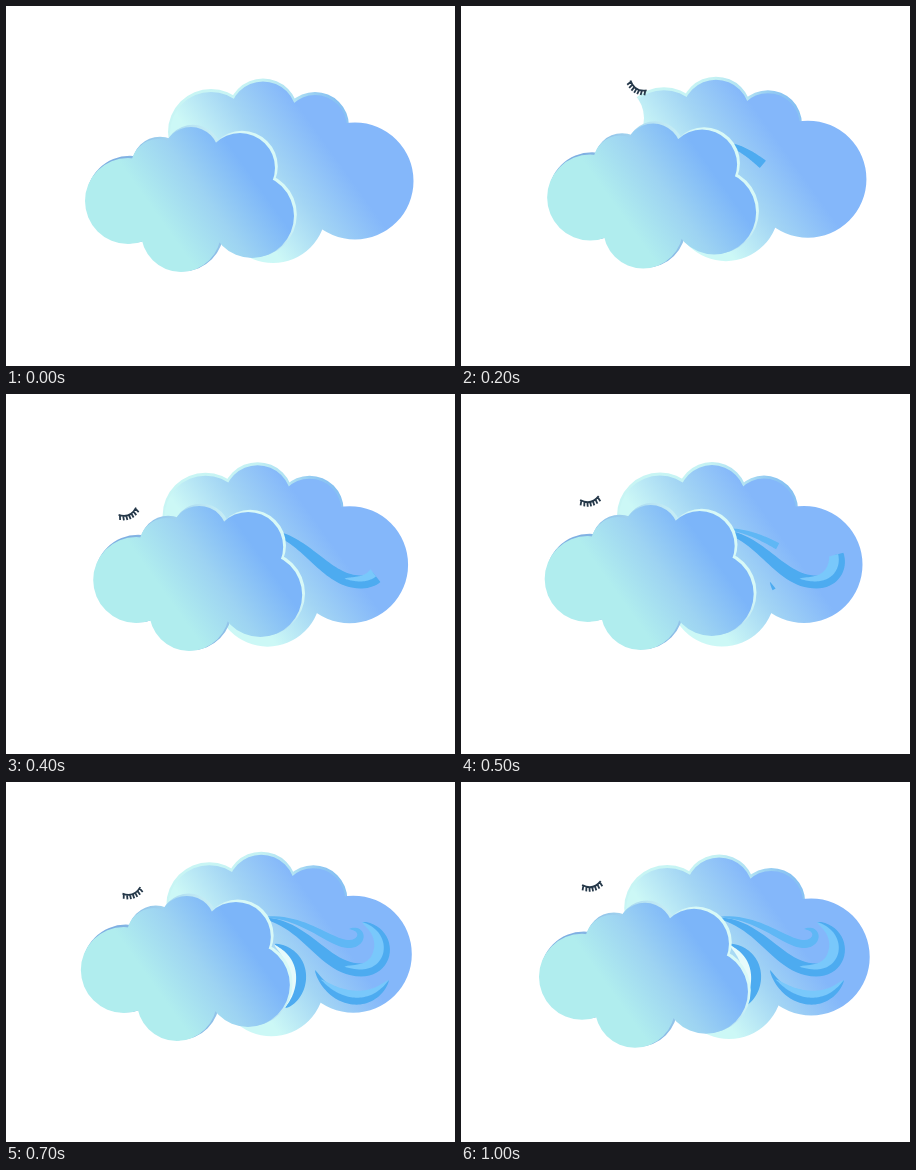
Recreate the animation shown at these times as an HTML page with a canvas. Size 449 by 360 pixels, loop 1050 ms.

```html
<!DOCTYPE html>
<html lang="en">
<head>
<meta charset="utf-8">
<title>Windy clouds</title>
<style>
  html, body { margin: 0; width: 100%; height: 100%; overflow: hidden; background: #fff; }
  canvas { display: block; }
</style>
</head>
<body>
<canvas id="stage" width="449" height="360"></canvas>
<script>
const ctx = document.getElementById('stage').getContext('2d');
const LOOP = 1050, STEP = 50;
const DARK = '#4dabf0', LIGHT = '#79c8fb', PALE = '#e6fbfb';

// puffs of each cloud: x, y, radius, clockwise
const FRONT = [[122, 195, 43], [152, 160, 27], [185, 149, 28], [234, 162, 35], [246, 210, 42], [175, 226, 40]];
const BACK = [[205, 127, 41], [257, 109, 33.5], [309, 121, 32], [349, 175, 58.5], [267, 204, 53]];

// key poses: time, then values
const FRONT_X = [[0, 0], [300, 9.5], [850, -7], [LOOP, 0]];
const FRONT_Y = [[0, 0], [500, -10], [LOOP, 0]];
const BACK_X = [[0, 0], [500, -6], [925, 3.5], [LOOP, 0]];
const BACK_Y = [[0, 0], [450, -4.5], [LOOP, 0]];
const LASHES = [[200, 176, 82, 0.55], [300, 116, 133, -0.6], [500, 129, 107, -0.2], [600, 124, 115, -0.42], [850, 131, 104, -0.2]];

// gusts as chained cubic curves
const MAIN = [[255, 136], [300, 140], [318, 188], [355, 188], [385, 188], [388, 148], [356, 140]];
const UPPER = [[258, 135], [300, 134], [325, 163], [344, 162], [358, 161], [358, 145], [343, 147]];
const LOWER = [[309, 188], [325, 222], [365, 230], [383, 198]];
const SIDE = [[268, 162], [303, 172], [300, 212], [279, 226]];

const clamp = v => Math.max(0, Math.min(1, v));
const ease = k => (1 - Math.cos(Math.PI * k)) / 2;

function pose(keys, t) {
  const next = keys.findIndex(key => key[0] > t);
  if (next < 0) return keys[keys.length - 1].slice(1);
  const a = keys[next - 1], b = keys[next];
  const k = ease((t - a[0]) / (b[0] - a[0]));
  return a.slice(1).map((v, i) => v + (b[i + 1] - v) * k);
}

function along(path, u) {
  const count = (path.length - 1) / 3;
  const seg = Math.min(count - 1, Math.floor(u * count));
  const k = u * count - seg, m = 1 - k;
  const [p, q, r, s] = path.slice(seg * 3, seg * 3 + 4);
  return [0, 1].map(c => m * m * m * p[c] + 3 * m * m * k * q[c] + 3 * m * k * k * r[c] + k * k * k * s[c]);
}

// tapered stroke between two fractions of a path, shifted sideways
function ribbon(path, color, width, to, from = 0, shift = 0) {
  if (to <= from) return;
  const left = [], right = [], n = 48;
  for (let i = 0; i <= n; i++) {
    const u = from + (to - from) * i / n;
    const [x, y] = along(path, u);
    const a = along(path, Math.max(0, u - 0.005)), b = along(path, Math.min(1, u + 0.005));
    const dir = Math.atan2(b[1] - a[1], b[0] - a[0]);
    const body = Math.pow(Math.max(0, Math.sin(Math.PI * (u - from) / (1 - from))), 0.65);
    const side = d => [x + Math.sin(dir) * d, y - Math.cos(dir) * d];
    left.push(side((shift + width / 2) * body));
    right.unshift(side((shift - width / 2) * body));
  }
  ctx.beginPath();
  left.concat(right).forEach(p => ctx.lineTo(...p));
  ctx.fillStyle = color;
  ctx.fill();
}

// diagonal gradient, rising to the right
function shade(x, y, length, colors) {
  const g = ctx.createLinearGradient(x, y, x + length * 0.81, y - length * 0.58);
  colors.forEach((c, i) => g.addColorStop(i / (colors.length - 1), c));
  return g;
}

function cloud(puffs, x, y, grow, fill) {
  ctx.save();
  ctx.translate(x, y);
  ctx.beginPath();
  puffs.forEach(p => ctx.lineTo(p[0], p[1]));
  ctx.closePath();
  for (const [cx, cy, r] of puffs) {
    ctx.moveTo(cx + r + grow, cy);
    ctx.arc(cx, cy, r + grow, 0, Math.PI * 2);
  }
  ctx.fillStyle = fill;
  ctx.fill();
  ctx.restore();
}

function wind(t) {
  const main = clamp((t - 90) / 510);
  const upper = clamp((t - 450) / 170);
  const lower = clamp((t - 490) / 130);
  const side = clamp((t - 500) / 100);
  ribbon(SIDE, DARK, 11, side);
  ribbon(SIDE, PALE, 9, side, 0, -9);
  ribbon(MAIN, DARK, 13, main);
  ribbon(MAIN, LIGHT, 10, main, 0.42, 6);
  ribbon(UPPER, '#5fb7f5', 8, upper);
  ribbon(LOWER, DARK, 9, lower);
  ribbon(LOWER, LIGHT, 7, lower, 0.1, 6);
}

function lashes(x, y, turn) {
  ctx.save();
  ctx.translate(x, y);
  ctx.rotate(turn);
  ctx.strokeStyle = '#26394a';
  ctx.lineWidth = 1.8;
  ctx.beginPath();
  ctx.moveTo(-9.5, -3);
  ctx.quadraticCurveTo(0, 5, 9.5, -3);
  for (let i = -3; i <= 3; i++) {
    const px = i * 2.8, py = 1 - px * px * 0.045;
    ctx.moveTo(px, py);
    ctx.lineTo(px * 1.2, py + 4.5);
  }
  ctx.stroke();
  ctx.restore();
}

function draw(t) {
  const [fx] = pose(FRONT_X, t), [fy] = pose(FRONT_Y, t);
  const [bx] = pose(BACK_X, t), [by] = pose(BACK_Y, t);
  const eye = t < LASHES[0][0] ? null : pose(LASHES, t);
  ctx.fillStyle = '#fff';
  ctx.fillRect(0, 0, 449, 360);

  cloud(BACK.slice(0, 3), bx, by - 1, 2, shade(235, 130, 100, ['#c8f5f4', '#c4f1f3', '#84bff2']));
  cloud(BACK, bx, by, 0, shade(220, 178, 105, ['#ccf8f6', '#a3d5f4', '#84b7fa']));
  if (eye) {
    ctx.beginPath();
    ctx.arc(eye[0] - 27, eye[1] + 30, 34, 0, Math.PI * 2);
    ctx.fillStyle = '#fff';
    ctx.fill();
  }
  wind(t);

  cloud(FRONT, fx + 2, fy - 1.5, 0.8, shade(125, 170, 110, ['#7fafe2', '#a4d6f0', '#d8f9f7']));
  cloud(FRONT, fx, fy, 0, shade(146, 202, 100, ['#b0edee', '#9dd3f2', '#7cb5f9']));
  if (eye) lashes(...eye);
}

const start = performance.now();
function tick() {
  const t = (performance.now() - start) % LOOP;
  draw(Math.floor(t / STEP) * STEP);
  requestAnimationFrame(tick);
}
tick();
</script>
</body>
</html>
```
